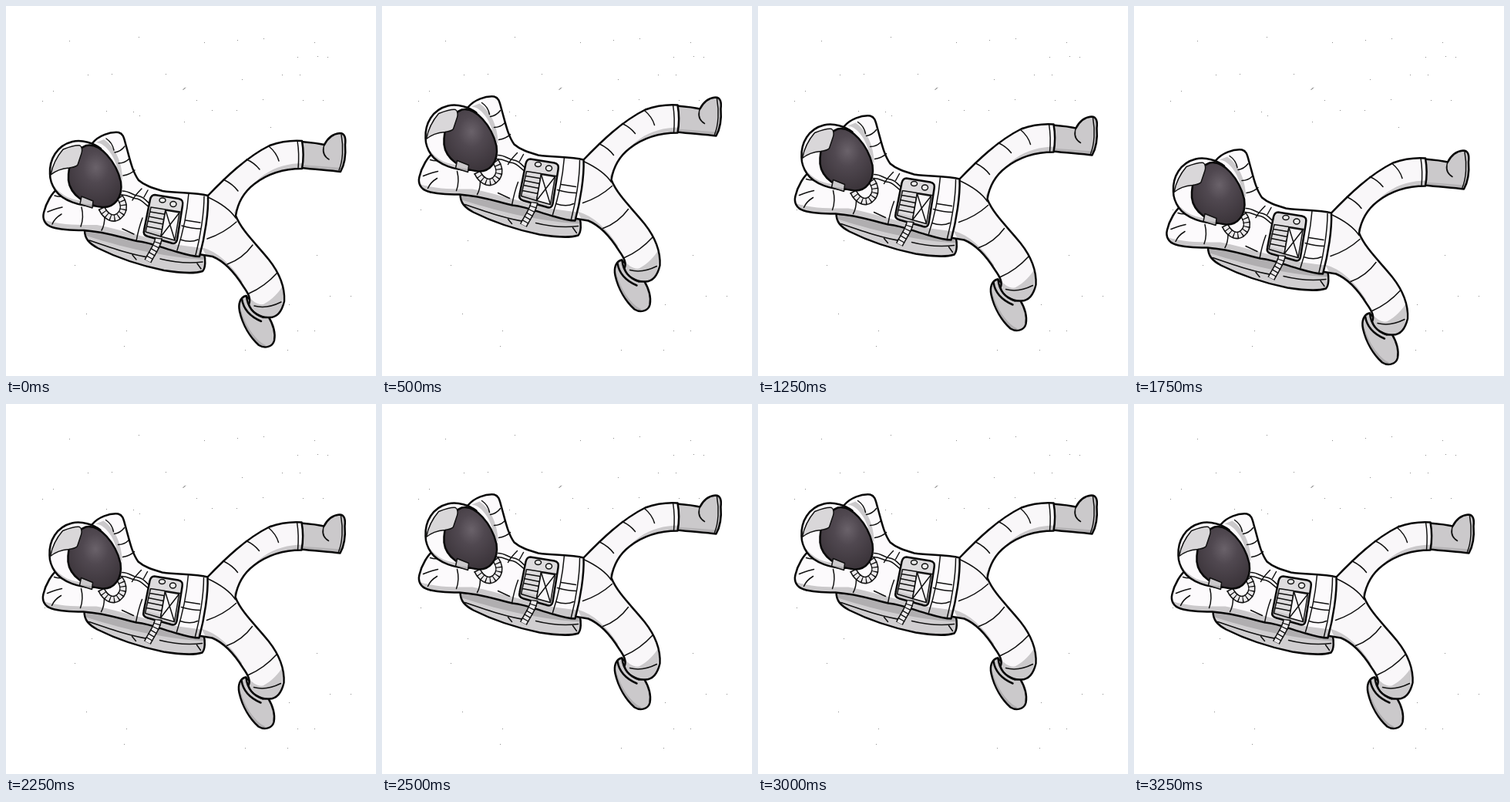
An HTML page that plays this animation: 480 px wide and 480 px high, repeating every 3.5 s.

```html
<!DOCTYPE html>
<html lang="en">
<head>
<meta charset="utf-8">
<title>Floating astronaut</title>
<style>
  html, body { margin: 0; width: 100%; height: 100%; overflow: hidden; background: #fff; }
  svg { display: block; width: 100%; height: 100%; }
  path { stroke-linecap: round; stroke-linejoin: round; }
  .ink { fill: none; stroke: #080808; stroke-width: 2.5; }
  .seam { fill: none; stroke: #111; stroke-width: 1.5; }
  .tube path { fill: none; stroke-linecap: butt; }
</style>
</head>
<body>
<svg viewBox="0 0 480 480">
  <defs>
    <radialGradient id="glass" cx=".52" cy=".36" r=".62">
      <stop offset="0" stop-color="#6a626a"/>
      <stop offset=".4" stop-color="#504850"/>
      <stop offset="1" stop-color="#3c353b"/>
    </radialGradient>
  </defs>
  <path id="stars" fill="#8c8c8c"/>
  <path d="M232.5 106L230 108.5" stroke="#555" stroke-width="1"/>
  <g id="man"></g>
</svg>
<script>
const WHITE = '#fcfafc', GREY = '#cbc9cb', DARK = '#b0aeb0';
const man = document.getElementById('man');
let count = 0, art = '';

// Filled outline with clipped shading and inner seams
function part(d, fill, shade, tone, seams = '', line = 'ink') {
  const id = 'clip' + count++;
  art += `<clipPath id="${id}"><path d="${d}"/></clipPath>
    <g clip-path="url(#${id})"><path d="${d}" fill="${fill}"/><path d="${shade}" fill="${tone}"/></g>
    <path class="seam" d="${seams}"/><path class="${line}" d="${d}"/>`;
}

function tube(d, width) {
  art += `<g class="tube"><path d="${d}" stroke="#111" stroke-width="${width}"/>
    <path d="${d}" stroke="#eceaec" stroke-width="${width - 3}"/>
    <path d="${d}" stroke="#111" stroke-width="${width}" stroke-dasharray="1.3 4.2"/></g>`;
}

// Backpack
part('M102 291C102 302 108 308 119 314C145 327 176 337 205 343C225 346 243 348 255 344C259 340 259 329 257 321L180 298Z',
  '#d0ced0', 'M100 290L258 318V329C215 327 160 316 104 298Z', DARK,
  'M108 304C140 315 163 323 190 327M164 323L169 329M200 328C220 333 240 334 255 332M248 334L253 341');

// Lower boot
part('M311 376C304 378 301 386 303 396C307 414 317 430 328 440C336 445 346 442 348 434C350 424 346 412 340 402L325 388Z',
  GREY, 'M302 383C307 410 322 433 337 440L328 446L300 410Z', DARK);

// Raised boot
part('M383 176C395 177 405 178 413 180C417 172 423 166 433 165C440 165 441 172 440 180C441 192 440 204 434 215C416 213 400 212 383 210Z',
  GREY, 'M382 206C402 207 418 209 436 210V218H380Z', '#b5b3b5',
  'M413 180C410 188 412 195 419 199M412 184C411 191 414 196 419 199M435 167C438 183 437 201 432 213');

// Legs
part('M261 247C285 222 312 196 342 181C356 176 370 174 384 175C386 186 386 200 384 211C360 211 340 217 322 231C309 241 301 253 298 272C306 292 325 309 341 329C356 348 362 365 361 383C358 396 352 404 342 404C330 405 318 397 315 387C318 380 315 374 308 364C298 348 285 332 268 325L250 322Z',
  '#f9f7f9', 'M386 204C348 204 318 222 296 268L304 282L330 230L386 213ZM361 360C354 372 345 381 334 387C326 388 320 383 314 376L312 390L328 408L356 408ZM254 313C275 319 292 335 307 358L301 363L262 328Z',
  GREY, 'M282 225C290 229 296 233 301 240M312 199C319 202 325 207 329 212M341 182C347 187 352 194 354 201M378 175C380 187 380 200 379 211M262 248C277 255 290 263 298 275M261 302C276 297 288 290 299 280M287 335C301 330 312 321 320 310M315 373C329 367 342 357 352 346M322 389C333 392 345 390 357 384');
art += `<path class="ink" d="M312 376C313 390 321 400 334 404"/>
  <path class="ink" d="M306 380C308 394 317 403 331 409"/>`;

// Body and arms
part('M112 178C120 168 135 163 146 164C153 166 153 172 156 182C161 200 164 215 172 226C180 233 190 236 203 240C225 243 245 242 262 246C263 267 258 299 251 325C242 325 232 322 222 319C204 314 188 307 170 305C148 300 130 293 101 291C85 291 70 290 60 287C50 284 47 276 49 268C52 255 60 242 67 237Z',
  WHITE, 'M48 277C72 285 98 284 118 284C153 291 188 303 224 310L254 314V328H210L100 295L54 291ZM117 177C130 178 143 197 146 219L151 226C151 205 143 184 127 173Z',
  GREY, 'M130 172C136 176 139 182 140 187M141 190C147 189 151 186 154 182M146 204C151 204 156 202 160 198M152 220C158 219 163 217 167 213M63 246C72 249 79 247 87 243M54 267C62 264 67 262 73 261M60 283C62 278 67 273 72 270M98 261C100 269 100 278 97 286M128 273C128 280 127 286 124 291M176 237C170 243 166 248 164 252M169 305C171 294 174 283 177 275M237 243C235 267 229 296 222 317M233 278L252 281M228 285C238 288 246 289 253 289M226 303C235 306 243 306 249 303M151 289L166 296M179 248L184 239M257 247C257 269 252 300 246 323');

// Helmet
tube('M124 262C129 273 139 279 147 272C155 265 153 255 147 247', 9.5);
part('M57 218C56 199 66 181 86 176C99 173 114 178 123 185L119 259C96 261 73 252 64 239C60 233 57 226 57 218Z',
  WHITE, 'M61 232C72 247 87 253 104 253L108 263H82L60 243Z', GREY);
part('M104 181C122 177 143 202 149 228C152 249 140 262 125 261C104 259 83 245 81 226C80 206 88 187 104 181Z',
  'url(#glass)', '', 'none');
part('M58 219C61 203 68 193 74 186C82 183 90 180 96 181C99 183 99 188 98 191L93 206C91 209 87 209 82 210C71 211 64 214 58 219Z',
  '#d9d7d9', '', 'none', '', 'seam');
part('M98 247L113 253L112 262L96 257Z', GREY, 'M98 256L113 258V263H97Z', DARK, '', 'seam');

// Wires, chest panel and outlet hose
art += `<path class="seam" d="M151 240C160 240 164 245 170 246C178 247 181 252 188 258M149 245C159 244 163 250 170 250C176 251 181 258 187 262"/>`;
part('M193 245L224 250C229 251 230 254 229 259L222 303C221 308 218 309 213 307L184 299C180 298 178 295 179 291L187 251C188 247 190 245 193 245Z',
  '#dedcde', 'M182 290L220 300L216 310L178 300Z', GREY,
  'M188 261L226 267M188 261L181 293L201 299L207 264M187 267L205 270M185 273L205 277M184 279L204 283M183 286L203 290');
art += `<path class="seam" d="M207 265L225 268L219 304L201 299Z" style="fill:#f9f7f9"/>
  <path class="seam" d="M207 265L219 304M225 268L201 299"/>
  <g class="seam" style="fill:#eee"><ellipse cx="203" cy="252" rx="4" ry="3"/><ellipse cx="217" cy="257" rx="4" ry="3.4"/></g>`;
tube('M198 301C197 311 190 319 184 331', 10);
man.innerHTML = art;

const stars = [82,45, 172,40, 257,47, 300,44, 334,42, 400,47, 61,110, 47,123, 137,88, 106,89,
  207,88, 247,122, 306,95, 358,89, 381,89, 404,65, 417,66, 378,66, 333,121, 385,122, 411,122,
  267,135, 299,135, 165,137, 130,136, 343,157, 231,150, 173,142, 403,323, 447,376, 420,376,
  313,367, 367,387, 104,399, 156,421, 153,441, 310,446, 365,446, 378,421, 400,421,
  50,264, 62,242, 111,304, 89,336];
let dots = '';
for (let i = 0; i < stars.length; i += 2) dots += `M${stars[i]} ${stars[i + 1]}h1v1h-1z`;
document.getElementById('stars').setAttribute('d', dots);

// Bobbing poses as [x, y], held for a quarter second each
const rest = [0, 0], up = [.5, -21.5], high = [-.5, -46.5], peak = [-2, -71];
const left = [-2, 0], leftUp = [-.5, -21.5], low = [-6, 22.5];
const poses = [rest, up, high, peak, high, leftUp, left, low, left, leftUp, high, peak, high, up];
const start = performance.now();

function draw(now) {
  const step = Math.floor(Math.max(0, now - start) / 250) % poses.length;
  man.setAttribute('transform', `translate(${poses[step]})`);
  requestAnimationFrame(draw);
}
draw(start);
</script>
</body>
</html>
```
